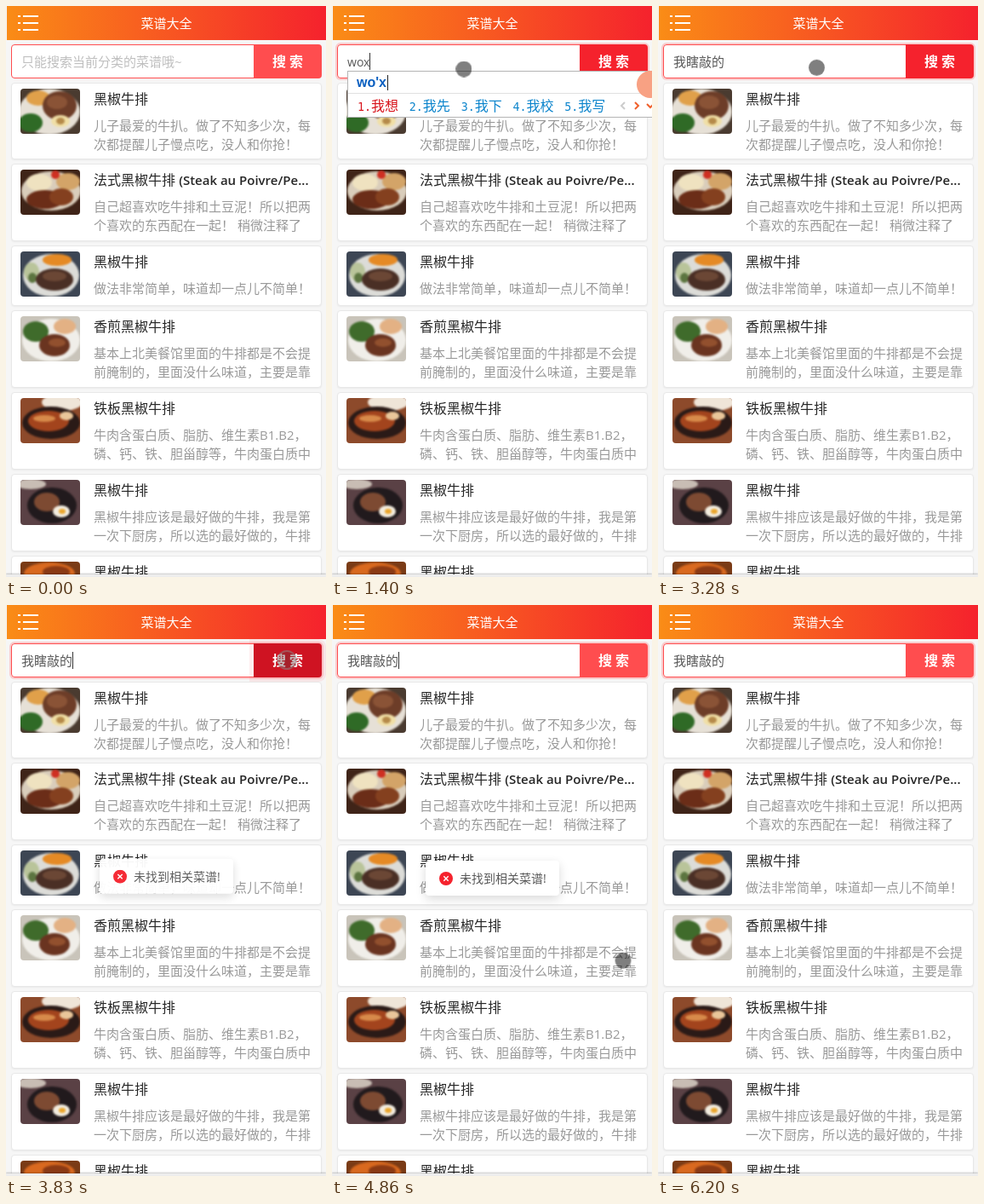
An HTML page that plays this animation: 376 by 670 pixels, repeating every 6350 ms.

```html
<!DOCTYPE html>
<html lang="zh-CN">
<head>
<meta charset="utf-8">
<title>菜谱大全</title>
<style>
  * { box-sizing: border-box; }
  html, body { margin: 0; width: 100%; height: 100%; overflow: hidden; }
  body {
    position: relative; background: #f6f6f6; white-space: nowrap;
    font: 15px/22px "Open Sans", "Noto Sans CJK SC", "Noto Sans CJK", sans-serif;
  }
  header, .search, .card, .ime, .toast, .cursor, .edge { position: absolute; }
  .search, .search button, .toast, .cursor, .press { animation: 6350ms linear infinite; }

  header {
    left: 1px; top: 0; width: 375px; height: 40px; color: #fff;
    line-height: 41px; text-align: center;
    background: linear-gradient(90deg, #fa8c16, #f5222d);
  }
  header svg { position: absolute; left: 12px; top: 9px; }

  .search { left: 6px; top: 45px; width: 365px; height: 40px; border-radius: 4px; animation-name: glow; }
  .field {
    width: 286px; height: 40px; padding-left: 11px; display: flex; align-items: center;
    background: #fff; border: 1px solid #ff4d4f; border-radius: 4px 0 0 4px; color: #595959;
  }
  .latin { position: relative; top: 1px; font-size: 14px; }
  .hint { color: #bfbfbf; }
  .caret { width: 1px; height: 20px; margin-right: -1px; background: #333; animation: blink 6350ms step-end infinite; }
  .search button {
    position: absolute; right: 0; top: 0; width: 80px; height: 40px; padding: 0; border: 0;
    border-radius: 0 4px 4px 0; color: #fff; font: bold 16px/40px "Open Sans", "Noto Sans CJK SC", "Noto Sans CJK", sans-serif;
    animation-name: tint, wave;
  }

  .card {
    left: 6px; width: 365px; background: #fff; border: 1px solid #e8e8e8; border-radius: 4px;
    box-shadow: 0 1px 2px rgba(0,0,0,.05);
  }
  .card svg { position: absolute; left: 10px; top: 6px; border-radius: 4px; }
  .card g { filter: blur(1px); }
  .card h2 { position: absolute; left: 96px; top: 6px; margin: 0; font-size: 16px; font-weight: 400; line-height: 24px; color: #262626; }
  .card h2 b { font-size: 15px; font-weight: 600; }
  .card p { position: absolute; left: 96px; top: 38px; margin: 0; color: #999; }
  .edge { left: 0; bottom: 0; width: 376px; height: 3px; background: #ededed; box-shadow: 0 -1px 2px rgba(0,0,0,.22); }

  .ime {
    left: 18px; top: 76px; height: 55px; padding: 0 6px 0 11px;
    background: #fff; border: 1px solid #b4b4b4;
  }
  .ime[hidden] { display: none; }
  .pinyin {
    height: 26px; display: flex; align-items: center; margin: 0 -6px 0 -11px; padding-left: 10px;
    border-bottom: 1px solid #e0e0e0; color: #0a5fc0;
    font: bold 16px/24px "Liberation Sans", sans-serif;
  }
  .pinyin::after { content: ""; width: 1px; height: 18px; margin-left: 1px; background: #222; }
  .words { display: flex; align-items: center; height: 27px; font-size: 16px; color: #0b84cc; }
  .words span { margin-right: 12.8px; }
  .words span:first-child { color: #d8141c; }
  .words b { font: 13.3px "DejaVu Sans Mono", monospace; }
  .words svg { fill: none; stroke-width: 2; }
  .badge { position: absolute; right: 0; top: -1px; width: 32px; height: 32px; border-radius: 50%; background: #f8a183; }

  .toast {
    left: 110px; top: 300px; width: 157px; height: 41px; padding-left: 16px; display: flex; align-items: center;
    gap: 8px; background: #fff; border-radius: 4px; box-shadow: 0 4px 12px rgba(0,0,0,.15);
    font-size: 14px; color: #595959; animation-name: toast;
  }
  .cursor { left: -9.5px; top: -9.5px; width: 19px; height: 19px; animation-name: move; }
  .press { width: 19px; height: 19px; border-radius: 50%; animation-name: press; }

  @keyframes glow {
    0%, 10.24% { box-shadow: 0 0 0 0 rgba(255,77,79,0); }
    13.07%, 100% { box-shadow: 0 0 0 2px rgba(255,77,79,.25); }
  }
  @keyframes tint {
    0%, 10.24% { background: #ff4d4f; }
    13.07%, 53.5% { background: #f5222d; }
    55.5%, 56.7% { background: #ff4d4f; }
    58%, 62.4% { background: #cf1322; }
    64.7% { background: #d41a28; }
    65.5%, 100% { background: #ff4d4f; }
  }
  @keyframes wave {
    0%, 57.3% { box-shadow: 0 0 0 0 rgba(245,34,45,.2); animation-timing-function: cubic-bezier(.08,.82,.17,1); }
    60.3% { box-shadow: 0 0 0 5px rgba(245,34,45,.08); }
    62.4%, 100% { box-shadow: 0 0 0 6px rgba(245,34,45,0); }
  }
  @keyframes blink {
    0%, 49.61%, 65.51%, 81.73%, 97.64%, 100% { opacity: 0; }
    10.24%, 57.48%, 73.7%, 89.76% { opacity: 1; }
  }
  @keyframes toast {
    0%, 57.95% { transform: translateY(-57px); opacity: 0; animation-timing-function: cubic-bezier(.08,.82,.17,1); }
    62.68%, 90.08% { transform: none; opacity: 1; animation-timing-function: cubic-bezier(.6,.04,.98,.34); }
    94.8%, 100% { transform: translateY(-8px); opacity: 0; }
  }
  @keyframes move {
    0%, .46% { transform: translate(200px, 612px); opacity: 0; }
    .47% { transform: translate(200px, 612px); opacity: 1; animation-timing-function: cubic-bezier(.3,.3,.4,1); }
    7.87%, 50.2% { transform: translate(154.5px, 73.5px); animation-timing-function: ease-in-out; }
    55.2%, 70.08% { transform: translate(329.5px, 64px); }
    71.34%, 73.2% { transform: translate(330px, 68px); }
    76.54% { transform: translate(341.5px, 416px); }
    80.2% { transform: translate(348.5px, 648px); opacity: 1; }
    80.3%, 100% { transform: translate(348.5px, 648px); opacity: 0; }
  }
  @keyframes press {
    0%, 56.6%, 62.5%, 100% { background: rgba(0,0,0,.5); box-shadow: 0 0 0 0 rgba(140,120,120,0); }
    56.7%, 62.4% { background: rgba(90,60,60,.35); box-shadow: 0 0 0 2px rgba(140,120,120,.65); }
  }
</style>
</head>
<body>
<header>
  <svg width="26" height="22" stroke="#fff" stroke-width="2"><path d="M1 3h3m3 0h18M1 11h3m3 0h18M1 19h3m3 0h18"/></svg>
  菜谱大全
</header>
<main></main>
<div class="edge"></div>
<div class="search">
  <div class="field"><span class="typed"></span><i class="caret"></i><span class="hint">只能搜索当前分类的菜谱哦~</span></div>
  <button>搜 索</button>
</div>
<div class="toast">
  <svg width="16" height="16"><circle cx="8" cy="8" r="8" fill="#f5222d"/><path d="M5.3 5.3l5.4 5.4m0-5.4l-5.4 5.4" stroke="#fff" stroke-width="1.4"/></svg>
  <span>未找到相关菜谱!</span>
</div>
<div class="ime" hidden>
  <div class="pinyin"></div>
  <div class="words"></div>
  <i class="badge"></i>
</div>
<div class="cursor"><div class="press"></div></div>

<script>
const $ = selector => document.querySelector(selector);

// Each dish: background, then ellipses as "colour cx cy rx ry".
const recipes = [
  { top: 90, height: 90, title: '黑椒牛排',
    text: '儿子最爱的牛扒。做了不知多少次，每<br>次都提醒儿子慢点吃，没人和你抢！',
    dish: ['#4a3b30', '#e6e0d6 34 27 36 27', '#e0a04a 21 11 14 9', '#2f6a26 12 40 14 11',
      '#6d3d28 46 20 20 17', '#8a5336 43 16 12 8', '#f0dfa6 47 38 11 7', '#b58a4a 47 38 5 4'] },
  { top: 185, height: 91, title: '法式黑椒牛排 <b>(Steak au Poivre/Pe...</b>',
    text: '自己超喜欢吃牛排和土豆泥！所以把两<br>个喜欢的东西配在一起！ 稍微注释了',
    dish: ['#3f2418', '#d9cdbb 36 25 35 23', '#efe2c0 22 15 15 10', '#d3a468 56 14 14 10',
      '#cf2f22 41 6 5 5', '#6b2d18 29 35 22 11', '#84401f 48 32 14 10'] },
  { top: 281, height: 71, title: '黑椒牛排',
    text: '做法非常简单，味道却一点儿不简单！',
    dish: ['#3d4654', '#dcdcd8 36 28 33 25', '#e58a25 43 10 17 7', '#b9c49a 13 24 9 11',
      '#5c7540 14 31 5 6', '#4a2f25 40 33 22 13', '#6b4735 40 29 14 6'] },
  { top: 357, height: 91, title: '香煎黑椒牛排',
    text: '基本上北美餐馆里面的牛排都是不会提<br>前腌制的，里面没什么味道，主要是靠',
    dish: ['#c9c4ba', '#f0eee9 36 28 34 25', '#3f6b2b 18 18 15 12', '#e3b184 52 12 13 9',
      '#6a3420 40 34 18 13', '#92502e 43 31 10 5'] },
  { top: 453, height: 91, title: '铁板黑椒牛排',
    text: '牛肉含蛋白质、脂肪、维生素B1.B2，<br>磷、钙、铁、胆甾醇等，牛肉蛋白质中',
    dish: ['#8d4a2b', '#efe5d8 49 5 24 10', '#2a1a17 36 29 34 19', '#a3441d 33 27 24 12',
      '#d78a4a 28 24 13 4', '#e9c69a 54 21 8 5'] },
  { top: 549, height: 91, title: '黑椒牛排',
    text: '黑椒牛排应该是最好做的牛排，我是第<br>一次下厨房，所以选的最好做的，牛排',
    dish: ['#5a4145', '#c8bdb4 12 5 18 6', '#211a1d 37 30 29 21', '#7d4a32 31 26 15 11',
      '#f2ecdf 48 37 10 7', '#e9a52c 49 37 4 3'] },
  { top: 645, height: 91, title: '黑椒牛排', text: '',
    dish: ['#7a3b16', '#d9691f 34 14 30 13', '#8b3a14 42 12 16 7'] },
];

function drawDish([background, ...shapes]) {
  const ellipses = shapes.map(shape => {
    const [fill, cx, cy, rx, ry] = shape.split(' ');
    return `<ellipse fill="${fill}" cx="${cx}" cy="${cy}" rx="${rx}" ry="${ry}"/>`;
  });
  return `<svg width="70" height="53" style="background:${background}"><g>${ellipses.join('')}</g></svg>`;
}

$('main').innerHTML = recipes.map(({ top, height, title, text, dish }) =>
  `<section class="card" style="top:${top}px;height:${height}px">${drawDish(dish)}<h2>${title}</h2><p>${text}</p></section>`
).join('');

// Typing steps: start in ms, pinyin, candidates.
const steps = [
  [0, '', ''],
  [1110, 'w', '我 为 无 完 问'],
  [1250, 'wo', '我 我们 我的 我是 我要'],
  [1400, "wo'x", '我想 我先 我下 我校 我写'],
  [1540, "wo'xi", '我喜 我系 我洗 我习 我西'],
  [1590, "wo'xia", '我下 我吓 我瞎 我夏 我想'],
  [1880, "wo'xia'q", '我下去 我先去 我想去 我下 我吓'],
  [1960, "wo'xia'qi", '我下棋 我下期 我下去 我下 我吓'],
  [2040, "wo'xia'qia", '我下恰 我瞎掐 我下 我吓 我瞎'],
  [2120, "wo'xia'qiao", '我瞎敲 我下桥 我下 我吓 我瞎'],
  [2250, "wo'xia'qiao'd", '我下桥的 我瞎敲的 我瞎敲 我下 我吓'],
  [2400, "wo'xia'qiao'de", '我瞎敲的 我下桥的☁ 我瞎敲 我下 我吓'],
  [2760, '', ''],
];
const cloud = '<svg width="13" height="12" style="vertical-align:4px" stroke="#5aa9dc"><path stroke-width="1" d="M3 8a2.2 2.2 0 0 1 0-4a3.5 3.5 0 0 1 6.6 0a2.2 2.2 0 0 1 0 4zM5 10h3"/></svg>';
const arrows = '<svg width="46" height="16" style="margin-left:4px"><path stroke="#ccc" d="M6 4L2 8l4 4"/><path stroke="#f0602c" d="M18 4l4 4l-4 4M32 6l4 4l4-4"/></svg>';

let shown = -1;
function show(index) {
  if (index === shown) return;
  shown = index;
  const [, pinyin, words] = steps[index];
  const committed = index === steps.length - 1;
  $('.typed').textContent = committed ? '我瞎敲的' : pinyin.replaceAll("'", '');
  $('.typed').classList.toggle('latin', !committed);
  $('.hint').hidden = index > 0;
  $('.ime').hidden = !pinyin;
  $('.pinyin').textContent = pinyin;
  $('.words').innerHTML = words.split(' ').map((word, i) =>
    `<span><b>${i + 1}.</b>${word.replace('☁', cloud)}</span>`).join('') + arrows;
}

let start;
function frame(now) {
  start ??= now;
  const time = (now - start) % 6350;
  show(steps.findLastIndex(step => step[0] <= time));
  requestAnimationFrame(frame);
}
show(0);
requestAnimationFrame(frame);
</script>
</body>
</html>
```
